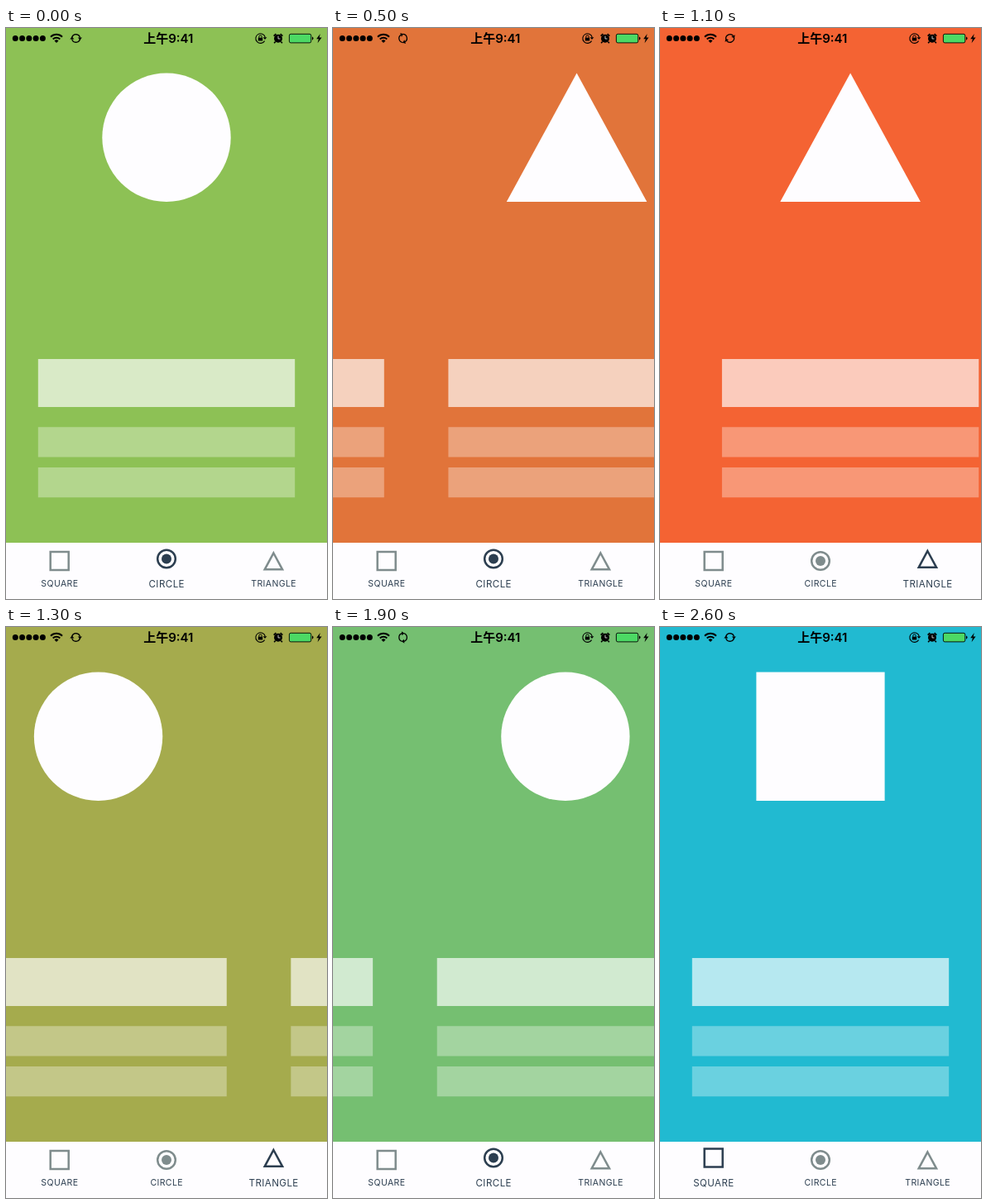
An HTML page that plays this animation: 388 by 690 pixels, repeating every 2.7 s.

```html
<!DOCTYPE html>
<html lang="zh">
<head>
<meta charset="utf-8">
<style>
  html, body { margin: 0; height: 100%; overflow: hidden; }
  svg { display: block; width: 388px; height: 690px; }
  text { text-anchor: middle; }
  .clock { font: 600 15px Inter, "Noto Sans CJK SC", sans-serif; }
  .label { font: 400 10.5px Inter, sans-serif; letter-spacing: .4px; fill: #2c3e50; }
  .line { fill: none; stroke: #000; }
</style>
</head>
<body>
<svg viewBox="0 0 388 690">
  <defs>
    <g id="bars" fill="#fff">
      <rect x="38.8" y="400" width="310.4" height="58" opacity=".67"/>
      <path d="M38.8 482.3h310.4v36.3H38.8zM38.8 531h310.4v36.3H38.8z" opacity=".33"/>
    </g>
    <g id="arrow">
      <path class="line" d="M-4.8-1.6A5.1 5.1 0 0 1 4.9-.8" stroke-width="1.3"/>
      <path d="M2.3-.9h5L4.8 2.2z"/>
    </g>
  </defs>

  <rect id="backdrop" width="388" height="690"/>
  <g id="pages" fill="#fefdff">
    <g>
      <rect x="116.4" y="54.5" width="155.2" height="155.5"/>
      <use href="#bars"/>
    </g>
    <g transform="translate(388)">
      <circle cx="194" cy="132.3" r="77.7"/>
      <use href="#bars"/>
    </g>
    <g transform="translate(776)">
      <path d="M194 54.5L278.8 210H109.2z"/>
      <use href="#bars"/>
    </g>
  </g>

  <g id="status">
    <path d="M11.3 12.5h33.2" stroke="#000" stroke-width="7" stroke-linecap="round" stroke-dasharray="0 8.27"/>
    <path d="M61 18l-2.5-2.6a3.6 3.6 0 0 1 5 0z"/>
    <path class="line" d="M56.7 13.5a6.2 6.2 0 0 1 8.6 0M54 10.7a10 10 0 0 1 14 0" stroke-width="2"/>
    <g id="spinner">
      <use href="#arrow"/>
      <use href="#arrow" transform="rotate(180)"/>
    </g>
    <text class="clock" x="196.3" y="18">上午9:41</text>

    <path class="line" d="M312.6 15.6A5.8 5.8 0 1 1 313.2 11" stroke-width="1.1"/>
    <path d="M310.6 11.2h4.8l-2.4 2.8zM304.8 11.7h5.4v3.9h-5.4z"/>
    <path class="line" d="M305.9 12v-1.6a1.6 1.6 0 0 1 3.2 0V12" stroke-width="1"/>

    <circle cx="329" cy="12.8" r="5"/>
    <path class="line" d="M323.6 9.6l2.8-2.5M334.4 9.6l-2.8-2.5M325.6 16.6l-1.5 1.7M332.4 16.6l1.5 1.7" stroke-width="1.6"/>
    <path d="M329 9.6v3.4h2.5" fill="none" stroke="#fff" stroke-opacity=".75"/>

    <rect x="342.4" y="7.3" width="26.4" height="10.6" rx="1.8" fill="#4cd964" stroke="#000" stroke-width=".9"/>
    <path d="M370 10.5a2.2 2.2 0 0 1 0 4.2z"/>
    <path d="M379.8 7l-4.6 6.2h2.7l-1.3 5 5-6.6h-2.9z"/>
  </g>

  <rect y="622" width="388" height="68" fill="#fefdff"/>
  <g id="tabs"></g>
</svg>
<script>
const LOOP = 2700, STEP = 100, WIDTH = 388;
const COLORS = [[33, 186, 209], [141, 193, 85], [255, 89, 48]];
const GRAY = [127, 140, 141], NAVY = [44, 62, 80];
const SWIPES = [{ start: 217, by: 1 }, { start: 1001, by: -1 }, { start: 1755, by: -1 }];
const TABS = [
  ['SQUARE', 64.7, '<rect x="-11" y="-11" width="22" height="22"/>'],
  ['CIRCLE', 194, '<circle r="10.8"/><circle class="dot" r="6" stroke="none"/>'],
  ['TRIANGLE', 323.4, '<path d="M0-9.5L10.7 10.3h-21.4z"/>']
];

const $ = id => document.getElementById(id);
const clamp = x => Math.min(1, Math.max(0, x));
const easeOut = x => 1 - (1 - clamp(x)) ** 3;
const mix = (a, b, k) => `rgb(${a.map((v, i) => Math.round(v + (b[i] - v) * k))})`;
// finger drag that runs out into a deceleration
const swipe = ms => 1 - Math.exp(-((Math.max(0, ms) / 251) ** 2.5));

$('tabs').innerHTML = TABS.map(([name, x, icon]) =>
  `<g transform="translate(${x})"><g class="icon" fill="none" stroke-width="2.5">${icon}</g>
   <text class="label" x=".2" y="3.8">${name}</text></g>`).join('');
const tabs = [...$('tabs').children].map(g => ({
  icon: g.querySelector('.icon'), dot: g.querySelector('.dot'), label: g.querySelector('text')
}));

function draw(t) {
  let page = 1;
  for (const { start, by } of SWIPES) page += by * swipe(t - start);
  const left = Math.min(1, Math.floor(page));
  $('backdrop').setAttribute('fill', mix(COLORS[left], COLORS[left + 1], page - left));
  $('pages').setAttribute('transform', `translate(${-page * WIDTH})`);
  $('spinner').setAttribute('transform', `translate(84.6 12.5) rotate(${t / 1300 * 180})`);

  const [a, b, c] = SWIPES.map(s => easeOut((t - s.start - 380) / 250));
  [c, 1 - a + b - c, a - b].forEach((on, i) => {
    const { icon, dot, label } = tabs[i], color = mix(GRAY, NAVY, on);
    icon.setAttribute('transform', `translate(0 ${644 - 2.5 * on})`);
    icon.setAttribute('stroke', color);
    if (dot) dot.setAttribute('fill', color);
    label.setAttribute('transform', `translate(0 671.5) scale(${1 + 0.1 * on})`);
  });
}

function tick() {
  draw(Math.floor(performance.now() % LOOP / STEP) * STEP);
  requestAnimationFrame(tick);
}
tick();
</script>
</body>
</html>
```
